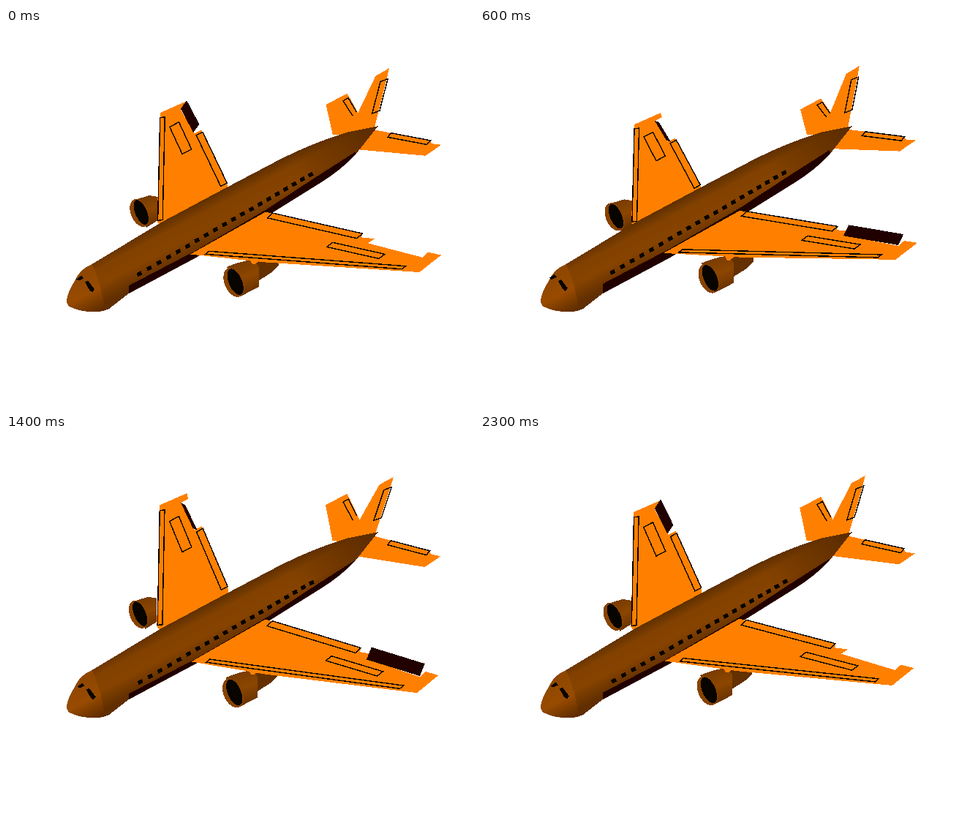
These frames come from a looping animation (640x517 px, 2.4 s). An HTML page:

```html
<!DOCTYPE html>
<html lang="en">
<head>
<meta charset="utf-8">
<title>Rolling airliner</title>
<style>
  html, body { margin: 0; width: 100%; height: 100%; overflow: hidden; background: #fff; }
  svg { display: block; width: 100vw; height: 100vh; }
  .skin { fill: #ff8000; }
  .line { fill: none; stroke: #000; stroke-width: 1.4; vector-effect: non-scaling-stroke; }
  .dark { fill: #210000; }
  .glass { fill: #080400; }
</style>
</head>
<body>
<svg viewBox="0 0 640 517" shape-rendering="crispEdges">
  <defs>
    <linearGradient id="hull" gradientUnits="userSpaceOnUse" x1="212" y1="266" x2="241" y2="321">
      <stop offset="0" stop-color="#603000"/>
      <stop offset=".25" stop-color="#824100"/>
      <stop offset=".6" stop-color="#864300"/>
      <stop offset="1" stop-color="#602e00"/>
    </linearGradient>
    <linearGradient id="tailShade" gradientUnits="userSpaceOnUse" x1="395" y1="200" x2="500" y2="145">
      <stop offset="0" stop-color="#512600" stop-opacity="0"/>
      <stop offset="1" stop-color="#512600" stop-opacity=".75"/>
    </linearGradient>
    <linearGradient id="nose" gradientUnits="userSpaceOnUse" x1="96" y1="342" x2="120" y2="390">
      <stop offset="0" stop-color="#8f4700"/>
      <stop offset=".5" stop-color="#984b00"/>
      <stop offset="1" stop-color="#612d00"/>
    </linearGradient>
    <linearGradient id="cowl" x1=".3" y1="0" x2=".6" y2="1">
      <stop offset="0" stop-color="#753a00"/>
      <stop offset=".5" stop-color="#8c4600"/>
      <stop offset="1" stop-color="#653000"/>
    </linearGradient>
    <path id="body" d="M83 372Q85 360 94 346Q101 330 116 324L212 266L300 219L376 179Q420 157 465 143L509 134L478 173Q457 195 431 211L362 254L258 315L168 363L141 384Q132 388 124 388Q103 389 87 381Q83 378 83 372Z"/>
    <clipPath id="inBody"><use href="#body"/></clipPath>
  </defs>
  <g id="plane"></g>
</svg>
<script>
const NS = "http://www.w3.org/2000/svg";
const plane = document.getElementById("plane");
const movers = [];

function add(tag, attrs, parent = plane) {
  const node = document.createElementNS(NS, tag);
  for (const key in attrs) node.setAttribute(key, attrs[key]);
  return parent.appendChild(node);
}

const path = (kind, d, parent) => add("path", { class: kind, d }, parent);

// Flat surface: rolling displaces each point linearly with its distance from the pivot.
function surface(px, py, xx, xy, yx, yy) {
  const group = add("g", {});
  movers.push(r => group.setAttribute("transform",
    `translate(${px} ${py}) matrix(${1 + r * xx} ${r * yx} ${r * xy} ${1 + r * yy} 0 0) translate(${-px} ${-py})`));
  return group;
}

function slider(dx, dy, parent) {
  const group = add("g", {}, parent);
  movers.push(r => group.setAttribute("transform", `translate(${dx * r} ${dy * r})`));
  return group;
}

// Parallelogram along one edge, (ox, oy) wide.
const strip = (parent, kind, x1, y1, x2, y2, ox, oy) =>
  path(kind, `M${x1} ${y1}L${x2} ${y2}l${ox} ${oy}L${x1 + ox} ${y1 + oy}Z`, parent);

function engine(group, shell, x, y, rx, ry) {
  add("path", { d: shell, fill: "url(#cowl)" }, group);
  const tilt = { transform: `rotate(-23 ${x} ${y})`, cy: y };
  add("ellipse", { ...tilt, cx: x, rx: rx + 4, ry: ry + 2, fill: "#884300" }, group);
  add("ellipse", { ...tilt, cx: x + 2, rx, ry, class: "glass" }, group);
}

// Far side
engine(slider(-3, -13), "M177 240L197 234L209 236L209 268L193 278Z", 184, 258, 8, 18);
const farWing = surface(240, 267, .03, 0, .114, .263);
path("skin", "M207 266L211 131L247 115L249 121L239 126L257 155L267 150L302 217V228L212 272Z", farWing);
strip(farWing, "line", 260, 157, 293, 219, 8.5, -4.5);
strip(farWing, "line", 224, 148, 241, 181, 12.5, -6.5);
strip(farWing, "line", 211, 137, 208, 265, 6.5, -1);
const farAileronUp = strip(farWing, "dark", 239, 125, 256, 154, 8, -11);
const farAileronDown = strip(farWing, "dark", 239, 126, 255, 153, 6, 2);

// Tail
const farTail = surface(460, 140, .05, 0, .2, .4);
path("skin", "M447 146L438 111L466 96L470 101L485 124L482 145Z", farTail);
path("line", "M474 122L461 105L468 101L479 117", farTail);
const fin = surface(490, 150, 0, -.13, 0, -.08);
path("skin", "M470 146L480 114L501 63L519 52L516 70L503 137Z", fin);
strip(fin, "line", 518, 67, 509, 112, -10, 4);
const nearTail = surface(505, 132, -.02, 0, .126, .17);
path("skin", "M505 139L580 149L583 153L596 154L574 169L476 165Z", nearTail);
strip(nearTail, "line", 527, 142, 581, 149, -5, 5.5);

// Fuselage
for (const fill of ["url(#hull)", "url(#tailShade)"]) add("use", { href: "#body", fill });
const inBody = add("g", { "clip-path": "url(#inBody)" });
add("path", { fill: "url(#nose)", d: "M80 320H116Q130 346 137 395H80Z" }, inBody);
path("dark", "M168 350L258 303L356 246L420 204L478 167L500 260L168 400Z", slider(0, 6, inBody));

const glazing = slider(2.5, 6);
for (let i = 0; i < 20; i++) {
  const along = 13.5 * i - 0.062 * i * i;
  path("glass", `M${177.5 + along} ${333 - 0.58 * along}l6 -3l2 5l-6 3z`, glazing);
}
const cockpit = slider(3, 4);
path("glass", "M95 342L102 337L105 341L98 344Z", cockpit);
path("glass", "M107 346L111 344L120 356L117 360L113 357Z", cockpit);

// Near side
const nearEngine = slider(-3, 13);
add("path", { fill: "#643000", d: "M336 318L345 308H374V320L365 329L346 341Z" }, nearEngine);
engine(nearEngine, "M303 322Q318 315 337 312Q345 315 347 323V349L322 362Z", 313, 343, 9, 19);
path("skin", "M334 311L352 309L342 318H338Z", nearEngine);
const nearWing = surface(340, 238, -.03, 0, .113, .2);
path("skin", "M251 308L355 250L489 272L488 277L506 278L497 284L572 299L580 292L598 295L568 318L355 314Z", nearWing);
strip(nearWing, "line", 365, 251, 489, 272, -7.5, 6.5);
strip(nearWing, "line", 448, 285, 520, 297, -8, 6);
strip(nearWing, "line", 277, 303, 549, 311, -5, 4);
const nearAileronUp = strip(nearWing, "dark", 504, 270, 579, 283, -7, 15);

const STEP = 100, STEPS = 24;
const HALF = 12.5, FLIP = 3.5;          // in steps: half a roll cycle, first aileron reversal
const RATE = .12, LAG = 1.5, LOW = -.035;

// After a reversal the roll rate eases from -RATE to +RATE.
const glide = t => RATE * (t - 2 * LAG * (1 - Math.exp(-t / LAG)));

function draw(ms) {
  const step = Math.floor(ms / STEP) % STEPS;
  const phase = (step - FLIP + 2 * HALF) % (2 * HALF);
  const right = phase < HALF;
  const roll = LOW + (right ? glide(phase) : glide(HALF) - glide(phase - HALF));
  movers.forEach(move => move(roll));
  const show = (node, on) => node.setAttribute("visibility", on ? "visible" : "hidden");
  show(nearAileronUp, right);
  show(farAileronDown, right);
  show(farAileronUp, !right);
}

let start;
function tick(now) {
  start ??= now;
  draw(now - start);
  requestAnimationFrame(tick);
}
draw(0);
requestAnimationFrame(tick);
</script>
</body>
</html>
```
